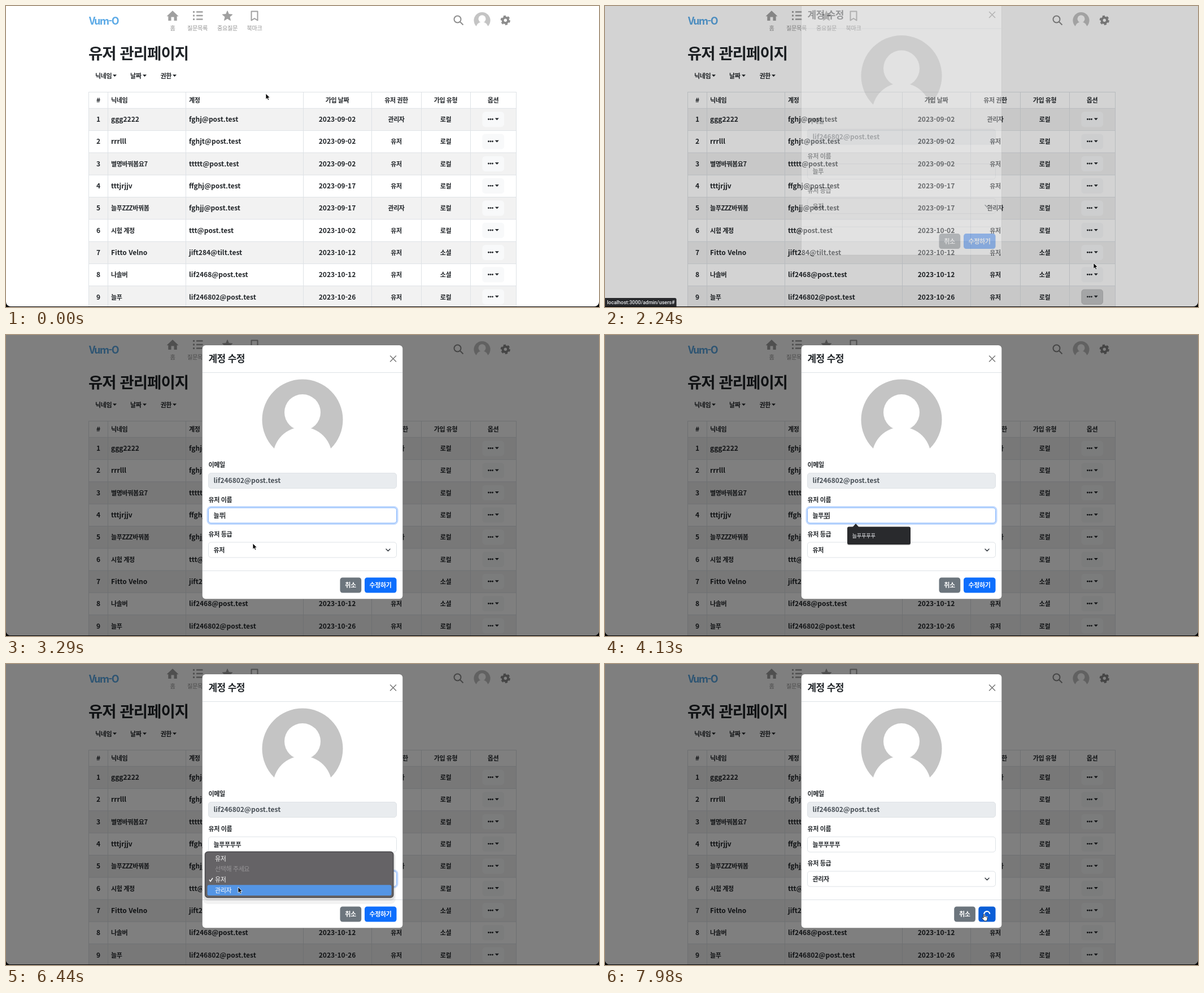
An HTML page that plays this animation: 1050x533 px, repeating every 8000 ms.

```html
<!DOCTYPE html>
<html lang="ko">
<head>
<meta charset="utf-8">
<title>유저 관리페이지</title>
<style>
  html, body { margin: 0; width: 100%; height: 100%; overflow: hidden; background: #000; }
  svg { display: block; }
  text { font: 700 12px "Noto Sans CJK KR", "Noto Sans CJK", "Noto Sans", sans-serif; fill: #212529; white-space: pre; }
  .k { font-size: 11px; letter-spacing: -.035em; }
  .mid { text-anchor: middle; }
  .line { stroke: #dee2e6; fill: none; }
  .field { fill: #fff; stroke: #dee2e6; }
  .ring { fill: #fff; stroke: #86b7fe; }
  .glow { fill: none; stroke: #0d6efd; stroke-opacity: .25; stroke-width: 3; }
</style>
</head>
<body>
<svg id="stage" width="1050" height="533" viewBox="0 0 1050 533"></svg>
<script>
const LOOP = 8000, STEP = 70;
const TOP = 181.3, ROW = 39.3;
const $ = id => document.getElementById(id);

const text = (s, x, y, style = '', cls = '', id = '') =>
  `<text x="${x}" y="${y}" class="${/[ㄱ-힣]/.test(s) ? 'k' : ''} ${cls}" style="${style}"${id && ` id="${id}"`}>${s}</text>`;
const mid = (s, x, y, style) => text(s, x, y, style, 'mid');
const rect = (x, y, w, h, r, attrs) =>
  `<rect x="${x}" y="${y}" width="${w}" height="${h}" rx="${r}" ${attrs}/>`;
const path = (d, attrs) => `<path d="${d}" ${attrs}/>`;
const caret = (x, y) => path(`M${x - 3.5} ${y}h7l-3.5 3.7z`, 'fill="#212529"');

const users = [
  ['ggg2222', 'fghj@post.test', '09-02', 1, 0],
  ['rrrlll', 'fghjt@post.test', '09-02', 0, 0],
  ['별명바꿔봄요7', 'ttttt@post.test', '09-02', 0, 0],
  ['tttjrjjv', 'ffghj@post.test', '09-17', 0, 0],
  ['늘푸ZZZ바꿔봄', 'fghjj@post.test', '09-17', 1, 0],
  ['시험 계정', 'ttt@post.test', '10-02', 0, 0],
  ['Fitto Velno', 'jift284@tilt.test', '10-12', 0, 1],
  ['나솔버', 'lif2468@post.test', '10-12', 0, 1],
  ['늘푸', 'lif246802@post.test', '10-26', 0, 0]
];

function star(cx, cy, r) {
  const pts = Array.from({ length: 10 }, (_, i) => {
    const a = i * Math.PI / 5, q = i % 2 ? r * .45 : r;
    return `${cx + q * Math.sin(a)},${cy - q * Math.cos(a)}`;
  });
  return `<polygon points="${pts.join(' ')}" fill="#a0a0a0" stroke="#a0a0a0" stroke-linejoin="round"/>`;
}

const avatar = (x, y, s) => `<g transform="translate(${x} ${y}) scale(${s})">
  <circle r="71.5" fill="#c4c4c4"/><circle cy="-13" r="32" fill="#fff"/><circle cy="65" r="52" fill="#fff"/></g>`;

function header() {
  const gray = 'fill="#a0a0a0"';
  let s = text('Vum-O', 147, 33, 'font-size:18px;fill:#5aa9e6;letter-spacing:-1.6px');
  s += path('M284.5 18.3L295 8.3l10.5 10h-2.8V26H297.500v-6.500h-5V26h-5.200v-7.700z', gray);
  for (const y of [10.5, 17, 23.5])
    s += rect(331, y - 1.5, 3, 3, .5, gray) + rect(337, y - 1.2, 11.500, 2.4, .5, gray);
  s += star(392, 18, 9.3);
  s += path('M434.500 9.500h11v16l-5.500-3.500-5.500 3.500z', 'fill="none" stroke="#a0a0a0" stroke-width="2" stroke-linejoin="round"');
  [['홈', 295], ['질문목록', 339], ['중요질문', 392], ['북마크', 440]].forEach(([n, x]) =>
    s += mid(n, x, 43, 'font-size:10.2px;font-weight:500;fill:#959595'));
  s += '<g fill="none" stroke="#8c8c8c" stroke-width="2"><circle cx="799.500" cy="23.500" r="6"/><path d="M804 28l5.500 5.500"/></g>';
  s += avatar(843, 25.5, .204);
  s += `<g fill="none" stroke="#8c8c8c"><circle cx="884.300" cy="25.300" r="4.700" stroke-width="4"/>
    <circle cx="884.300" cy="25.300" r="7.300" stroke-width="2.600" stroke-dasharray="4.200 3.445"/></g>`;
  s += text('유저 관리페이지', 146, 94, 'font-size:27.500px');
  [['닉네임', 158, 192.5], ['날짜', 220, 245.5], ['권한', 273.5, 298.5]].forEach(([n, x, c]) =>
    s += text(n, x, 128) + caret(c, 121.5));
  return s;
}

function table() {
  let s = '';
  const cols = [163.5, 186, 324, 586.5, 691, 778.5, 862.5];
  ['#', '닉네임', '계정', '가입 날짜', '유저 권한', '가입 유형', '옵션'].forEach((n, i) =>
    s += i == 1 || i == 2 ? text(n, cols[i], 171) : mid(n, cols[i], 171));
  users.forEach(([name, mail, date, admin, social], i) => {
    const y = TOP + i * ROW, c = y + ROW / 2, b = c + 4.2;
    s += rect(147, y, 756, ROW, 0, `id="row${i}"`);
    s += mid(i + 1, cols[0], b) + text(name, cols[1], b) + text(mail, cols[2], b);
    s += mid('2023-' + date, cols[3], b) + mid(admin ? '관리자' : '유저', cols[4], b) + mid(social ? '소셜' : '로컬', cols[5], b);
    s += rect(843.9, c - 13.2, 37.6, 26, 4.5, `id="btn${i}"`);
    for (const x of [854.5, 858, 861.5]) s += `<circle cx="${x}" cy="${c - .5}" r="1.450" fill="#212529"/>`;
    s += caret(869.3, c - 2.5);
  });
  let d = 'M146 152.500H904M146 181.300H904';
  for (let i = 1; i < 9; i++) d += `M146 ${TOP + i * ROW}H904`;
  for (const x of [146.5, 180.5, 318.5, 526.5, 647.5, 735.5, 822.5, 903.5]) d += `M${x} 152V533`;
  return s + path(d, 'class="line"');
}

const menu = () => `<g id="menu">${rect(843.9, 442.5, 113.6, 57.5, 4.5, 'fill="#fff" stroke="#d2d2d2"')}
  ${rect(844.5, 448, 112.4, 23, 0, 'id="item" fill="#f8f9fa"')}
  ${text('수정', 855.5, 464)}${text('삭제', 855.5, 487)}</g>`;

const box = (id, y, fill) => rect(358.5, y, 333, 27, 4.5, `class="field" style="fill:${fill}"`) +
  (id ? `<g id="${id}">${rect(357, y - 1.5, 336, 30, 6, 'class="glow"')}${rect(358.5, y, 333, 27, 4.5, 'class="ring"')}</g>` : '');

function modal() {
  const white = 'fill:#fff';
  return `<g id="modal">
    ${rect(347.5, 18, 355, 449.5, 6, 'fill="#fff" stroke="#000" stroke-opacity=".17"')}
    ${text('계정 수정', 358.5, 48, 'font-size:17px')}
    ${path('M680.500 37l10 10m0-10l-10 10', 'stroke="#777" stroke-width="1.500" stroke-linecap="round"')}
    ${path('M348 66.500H702M348 417.500H702', 'class="line"')}
    ${avatar(525, 150, 1)}
    ${text('이메일', 358.5, 234)}${text('유저 이름', 358.5, 296)}${text('유저 등급', 358.5, 357)}
    ${box('', 244.5, '#e9ecef')}${text('lif246802@post.test', 367.5, 262.3, 'fill:#495057')}
    ${box('nameRing', 306, '#fff')}${text('늘푸', 367.5, 323.5, '', '', 'name')}
    ${rect(0, 324.5, 9, 1, 0, 'id="under"')}${rect(0, 313.5, 1, 12, 0, 'id="bar"')}
    ${box('roleRing', 367, '#fff')}${text('유저', 367.5, 385, '', '', 'role')}
    ${path('M673 379l3.500 3.500 3.500-3.500', 'fill="none" stroke="#343a40" stroke-width="1.500" stroke-linecap="round"')}
    <g id="cancel">${rect(591.5, 429.5, 37.7, 27, 4.5, 'fill="#6c757d"')}${mid('취소', 610, 447, white)}</g>
    ${rect(635, 429.5, 56.5, 27, 4.5, 'id="send"')}
    <g id="sendText">${mid('수정하기', 663, 447, white)}</g>
    <circle id="spin" cx="676.300" cy="443" r="5" fill="none" stroke="#fff" stroke-width="2.200" stroke-dasharray="23.560 7.860"/>
  </g>`;
}

const tip = () => `<g id="tip">${rect(429, 340.5, 112, 32, 3, 'opacity=".2"')}
  ${path('M438.500 340l5.500-6 5.500 6z', 'fill="#292a2d"')}${rect(429, 339.5, 112, 31.5, 3, 'fill="#292a2d"')}
  ${text('늘푸푸푸푸', 437.5, 359, 'font-size:9.300px;font-weight:400;fill:#e8eaed')}</g>`;

function popup() {
  const item = (s, y, c = '#fff') => text(s, 370, y, `font-weight:400;fill:${c}`);
  return `<g id="popup">
    ${rect(348, 333, 342, 92, 9, 'opacity=".05"')}${rect(350, 332, 338, 87, 7, 'opacity=".08"')}
    ${rect(352.7, 332.5, 333, 81, 5, 'fill="#656366" stroke="#4a494c" stroke-width="1.500"')}
    ${rect(356.5, 0, 326, 18.7, 3, 'id="mark" fill="#5495e5"')}
    ${item('유저', 348.5)}${item('선택해 주세요', 367, '#969497')}${item('유저', 385.5)}${item('관리자', 404.5)}
    ${path('M360 382l2 3 4-6', 'fill="none" stroke="#fff" stroke-width="1.400"')}</g>`;
}

const status = () => `<g id="status">${path('M0 517h123.500q3 0 3 3v12H0z', 'fill="#28292c"')}
  ${text('localhost:3000/admin/users#', 3.5, 527.8, 'font:500 9px Roboto,sans-serif;fill:#e8eaed')}</g>`;

const pointer = () => `<g id="pointer">
  ${path('M0 0V10.300L2.400 8.200 4 11.800 5.700 11 4.200 7.500H7.300z', 'id="arrow" stroke="#fff" stroke-width=".8"')}
  ${path('M-1 7V1a.9.9 0 0 1 1.800 0V4.800l.2-.7a.9.9 0 0 1 1.700.2l.2.500a.9.9 0 0 1 1.600.4l.2.400a.8.8 0 0 1 1.300.6V8.500q0 2.500-2 3.500H1Q-.6 10.800-2.800 8.200L-3.700 7a.8.8 0 0 1 1.200-1z',
    'id="hand" fill="#fff" stroke="#222" stroke-width=".9"')}
  ${path('M-2-6q2 0 2 2V4q0 2-2 2M2-6q-2 0-2 2V4q0 2 2 2', 'id="beam" fill="none" stroke="#222"')}</g>`;

$('stage').innerHTML = rect(0, -10, 1050, 542, 8, 'fill="#fff"') +
  '<clipPath id="win">' + rect(0, -10, 1050, 542, 8, '') + '</clipPath>' +
  `<g clip-path="url(#win)">${header()}${table()}${menu()}${rect(0, 0, 1050, 533, 0, 'id="shade"')}</g>` +
  modal() + tip() + popup() + status() + pointer();

// time, x, y of the pointer
const track = [
  [0, 460, 155], [490, 966, 430], [840, 868, 512], [1190, 868, 512], [1540, 868, 437], [1680, 865.5, 450.5],
  [1820, 865, 455], [2380, 865, 455], [2730, 560, 285], [3150, 430, 318], [3500, 450, 463], [5110, 450, 463],
  [5180, 470, 421], [5950, 403, 381], [6160, 402, 384], [6440, 411, 395], [6790, 414, 401], [7630, 671, 443]
];
const typed = [
  [0, '늘푸'], [3850, '늘푸ㅍ'], [4130, '늘푸푸'], [4200, '늘푸푸ㅍ'], [4340, '늘푸푸푸'],
  [4410, '늘푸푸푸ㅍ'], [4550, '늘푸푸푸푸']
];

const clamp = v => Math.min(1, Math.max(0, v));
const span = (t, a, b) => t >= a && t < b;
const show = (id, on) => $(id).style.opacity = +on;
const set = (id, o) => { for (const k in o) $(id).setAttribute(k, o[k]); };

function place(t) {
  const i = track.findIndex(k => k[0] > t);
  if (i < 0) return track.at(-1).slice(1);
  const [a, x, y] = track[i - 1], [b, u, v] = track[i];
  const p = (t - a) / (b - a), e = p * p * (3 - 2 * p);
  return [x + (u - x) * e, y + (v - y) * e];
}

const menuOpen = t => span(t, 910, 1960);
function hovered(t) {
  if (t < 0 || t >= 1960) return {};
  const [x, y] = place(t);
  if (menuOpen(t) && x > 843 && x < 958 && y > 442 && y < 500) return { row: 8, item: y < 471 };
  if (x < 147 || x > 903 || y < TOP) return {};
  const row = Math.floor((y - TOP) / ROW), off = Math.abs(y - TOP - (row + .5) * ROW);
  return { row, btn: x > 843 && x < 882 && off < 13.5 ? row : -1 };
}

function draw(t) {
  const h = hovered(t), prev = hovered(t - STEP), [x, y] = place(t);

  users.forEach((_, i) => {
    set('row' + i, { fill: h.row === i ? '#ececec' : i % 2 ? '#fff' : '#f2f2f2' });
    const held = i == 8 && span(t, 910, 2310), over = h.btn === i || prev.btn === i;
    set('btn' + i, {
      fill: held ? '#c6c7c8' : over ? '#d3d4d5' : '#f8f9fa',
      stroke: held ? '#babbbc' : over ? '#c6c7c8' : '#f8f9fa'
    });
  });
  show('menu', menuOpen(t));
  show('item', !!h.item);

  const fade = clamp((t - 2188) / 150), rise = Math.pow(1 - clamp((t - 2188) / 300), 1.7);
  show('shade', fade * .5);
  show('modal', fade);
  set('modal', { transform: `translate(0 ${-36.5 * rise})` });
  show('status', clamp((t - 1890) / 140) * clamp((2730 - t) / 140));

  const value = typed.findLast(k => k[0] <= t)[1];
  $('name').textContent = value;
  const w = $('name').getComputedTextLength(), one = w / value.length;
  const focus = span(t, 3150, 5950);
  show('nameRing', focus);
  show('bar', focus);
  set('bar', { x: 367.5 + w });
  show('under', span(t, 3850, 4690));
  set('under', { x: 367.5 + w - one, width: one });
  show('tip', span(t, 3920, 4550));

  show('roleRing', span(t, 5950, 7770));
  $('role').textContent = t < 6790 ? '유저' : '관리자';
  show('popup', t < 5950 ? 0 : clamp((7000 - t) / 210));
  set('mark', { y: y < 391 ? 372.3 : 391.3 });
  show('mark', !span(t, 6720, 6790));

  const busy = t >= 7910, onSend = t >= 7560;
  set('cancel', { transform: `translate(${busy ? 26.7 : 0} 0)` });
  set('send', { x: busy ? 661.3 : 635, width: busy ? 30.2 : 56.5, fill: onSend ? '#0b5ed7' : '#0d6efd' });
  show('sendText', !busy);
  show('spin', busy);
  set('spin', { transform: `rotate(${45 + (t - 7910) / 750 * 360} 676.3 443)` });

  const beam = t > 2700 && t < 3500 && y > 306 && y < 333;
  const hand = onSend || h.btn >= 0 || 'item' in h;
  set('pointer', { transform: `translate(${x} ${y})` });
  show('pointer', !span(t, 3850, 5180));
  show('beam', beam);
  show('hand', hand && !beam);
  show('arrow', !hand && !beam);
}

const start = performance.now();
function tick() {
  const t = (performance.now() - start) % LOOP;
  draw(Math.floor(t / STEP) * STEP);
  requestAnimationFrame(tick);
}
tick();
</script>
</body>
</html>
```
